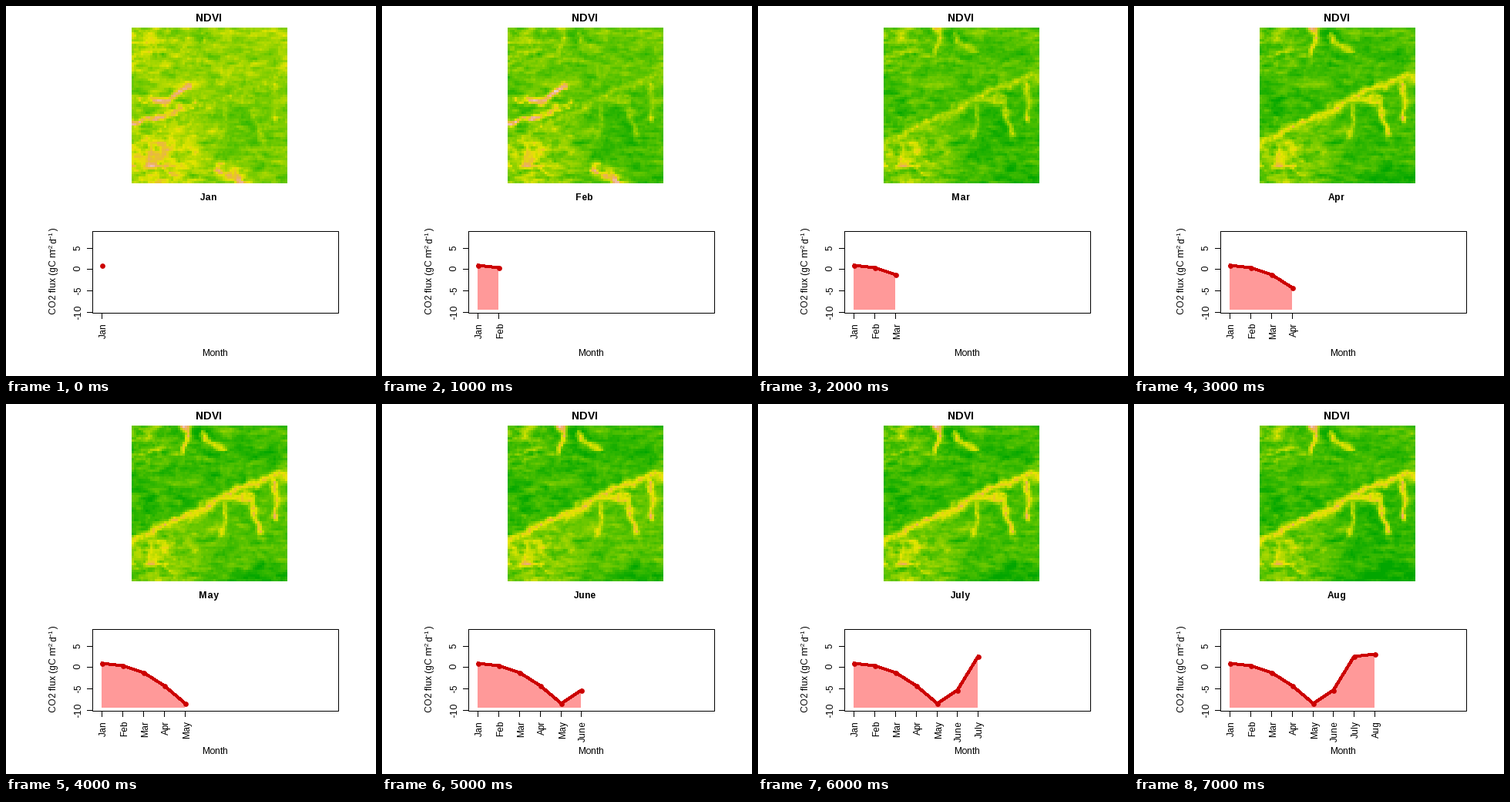
Write a matplotlib script that moves like this. It is 480 by 480 pixels and loops after 8 s.

```python
import colorsys

import numpy as np
import matplotlib.pyplot as plt
from matplotlib.animation import FuncAnimation
from matplotlib.colors import ListedColormap

plt.rcParams["font.family"] = "Liberation Sans"
plt.rcParams["text.hinting_factor"] = 1

MONTHS = ["Jan", "Feb", "Mar", "Apr", "May", "June", "July", "Aug"]
FLUX = np.array([1.0, 0.45, -1.2, -4.3, -8.5, -5.4, 2.6, 3.2])
DOT_X = np.round(124.1 + 26.87 * np.arange(8))
DOT_Y = np.round(341.5 - 5.5 * FLUX)
LEFT, TOP, SIZE, CELLS = 163, 28, 202, 67
RED, PINK = "#cc0000", "#ff9999"


def terrain(n=255):
    """Green to yellow to near white, mixed in HSV."""
    t = np.linspace(0, 1, n)
    stops = [0, 0.5, 1]
    h = np.interp(t, stops, [4 / 12, 2 / 12, 0])
    s = np.interp(t, stops, [1, 1, 0])
    v = np.interp(t, stops, [0.65, 0.9, 0.95])
    return ListedColormap([colorsys.hsv_to_rgb(*c) for c in zip(h, s, v)])


def noise(seed, sx, sy):
    """Smooth random field with unit spread; sx and sy are in cells."""
    field = np.random.default_rng(seed).normal(size=(CELLS, CELLS))
    fx = np.fft.fftfreq(CELLS)[None, :]
    fy = np.fft.fftfreq(CELLS)[:, None]
    blur = np.exp(-2 * np.pi ** 2 * ((fx * sx) ** 2 + (fy * sy) ** 2))
    field = np.fft.ifft2(np.fft.fft2(field) * blur).real
    return (field - field.mean()) / field.std()


step = (np.arange(CELLS) + 0.5) * SIZE / CELLS
GX, GY = np.meshgrid(LEFT + step, TOP + step)
WX = GX + 1.8 * noise(1, 1.5, 1.5)
WY = GY + 1.8 * noise(2, 1.5, 1.5)


def ridge(width, *points):
    """Soft band along a polyline."""
    best = np.full(GX.shape, 1e9)
    for (x0, y0), (x1, y1) in zip(points, points[1:]):
        dx, dy = x1 - x0, y1 - y0
        t = ((WX - x0) * dx + (WY - y0) * dy) / (dx * dx + dy * dy)
        t = np.clip(t, 0, 1)
        dist = (WX - x0 - t * dx) ** 2 + (WY - y0 - t * dy) ** 2
        best = np.minimum(best, dist)
    return np.exp(-best / width ** 2)


def blob(x, y, sx, sy):
    return np.exp(-((WX - x) / sx) ** 2 - ((WY - y) / sy) ** 2)


def rise(x, width):
    return 0.5 + 0.5 * np.tanh(x / width)


STREAMS = np.max([
    ridge(6, (160, 180), (205, 158), (245, 143), (285, 119), (352, 90), (367, 96)),
    ridge(4.5, (285, 122), (317, 120), (330, 166)),
    ridge(3.5, (346, 92), (349, 150)),
    0.7 * ridge(3.5, (284, 122), (282, 170)),
    ridge(4, (232, 30), (237, 46), (230, 63)),
    0.8 * ridge(3.5, (256, 38), (264, 52), (282, 60)),
], axis=0)

CLOUDS = np.max([
    ridge(4.5, (160, 154), (205, 142), (243, 129)),
    ridge(4.5, (180, 122), (212, 125), (234, 108)),
    ridge(6.5, (274, 211), (290, 221), (314, 229)),
], axis=0) * np.clip(0.9 + 0.3 * noise(6, 0.8, 0.6), 0.3, 1.3)

STREAKS = noise(3, 1.7, 0.6)
FINE = noise(4, 0.45, 0.45)
PATCHES = noise(5, 4, 2)
VEINS = np.exp(-(noise(7, 3, 2) / 0.35) ** 2)

SOUTH = rise(WY - 180 + 0.47 * (WX - LEFT), 8)
WEST = rise(250 - WX, 22)
CORNER = blob(185, 200, 50, 40)
HILLS = blob(185, 55, 45, 32)
TOP_EDGE = blob(238, 28, 60, 11) * (0.9 + 0.4 * PATCHES)
PEAK = blob(231, 28, 7, 8)


def ndvi(k):
    spring = np.clip(k / 4, 0, 1)
    spring = spring * spring * (3 - 2 * spring)
    summer = np.exp(-((k - 4.8) / 1.8) ** 2)
    thaw = np.exp(-k / 1.3)
    cloudy = np.exp(-((k - 0.6) / 0.85) ** 2)

    land = 0.13 + 0.19 * thaw + 0.04 * (1 - summer) * rise(100 - WY, 20)
    land += SOUTH * (0.13 * WEST + 0.11 * summer * (1 - 0.6 * WEST))
    land -= 0.09 * (1 - summer) * blob(310, 160, 40, 40)
    land -= 0.14 * spring * blob(320, 222, 50, 18)
    land += 0.16 * VEINS * (CORNER + spring * HILLS)
    land += TOP_EDGE * (0.16 + 0.18 * spring)
    rough = 0.8 + 0.6 * CORNER + 0.4 * HILLS
    land += rough * (0.045 * STREAKS + 0.025 * FINE + 0.025 * PATCHES
                     + 0.022 * noise(20 + k, 1.2, 0.6))

    bed = 0.42 + 0.14 * spring + 0.05 * FINE
    land += STREAMS * (0.55 + 0.45 * spring) * np.maximum(bed - land, 0)
    land += PEAK * (0.05 + 0.33 * spring) + 0.62 * cloudy * CLOUDS
    return np.clip(land, 0.01, 0.97)


MAPS = [ndvi(k) for k in range(8)]

# One unit is one pixel, y runs down.
fig = plt.figure(figsize=(480 / 72, 480 / 72), dpi=72, facecolor="white")
ax = fig.add_axes([0, 0, 1, 1])
ax.axis("off")


def label(x, y, text, size=12, ha="center", **kw):
    return ax.text(x, y, text, fontsize=size, ha=ha, va="baseline",
                   rotation_mode="anchor", **kw)


def stroke(xs, ys):
    return ax.plot(xs, ys, color="black", lw=1, solid_capstyle="projecting",
                   solid_joinstyle="miter")[0]


raster = ax.imshow(MAPS[0], cmap=terrain(), vmin=0, vmax=1,
                   interpolation="nearest", aspect="auto",
                   extent=(LEFT, LEFT + SIZE, TOP + SIZE, TOP))
ax.set_xlim(0, 480)
ax.set_ylim(480, 0)

label(262.7, 20, "NDVI", 14, weight="bold")
month = label(263, 252, "", weight="bold")
label(271.3, 454, "Month")

stroke([112, 431, 431, 112, 112], [292, 292, 398, 398, 292])
for value in (5, 0, -5, -10):
    y = round(341.4 - 5.53 * value)
    stroke([105, 112], [y, y])
    label(96.5, y, str(value), rotation=90)

y = 400
for text, width in [("CO2 flux (gC m", 82.5), ("−2", 9.5), ("d", 6.5),
                    ("−1", 9), (")", 4)]:
    raised = text[0] == "−"
    label(60.5 if raised else 65.5, y, text, 8.4 if raised else 12,
          ha="left", rotation=90)
    y -= width

ticks = [(stroke([x, x], [398, 405]),
          label(x + 6.3, 411.3, name, ha="right", rotation=90))
         for x, name in zip(DOT_X, MONTHS)]

area, = ax.fill([0], [0], color=PINK, lw=0, zorder=1.5, antialiased=False)
curve, = ax.plot([], [], color=RED, lw=3, marker="o", ms=6.8, mew=0, zorder=3,
                 antialiased=False)


def draw(k):
    n = k + 1
    raster.set_data(MAPS[k])
    month.set_text(MONTHS[k])
    xs, ys = DOT_X[:n], DOT_Y[:n]
    curve.set_data(xs + 0.5, ys + 0.5)
    area.set_xy(np.column_stack([np.r_[xs, xs[-1], xs[0]],
                                 np.r_[ys, 394, 394]]))
    area.set_visible(n > 1)
    for i, pair in enumerate(ticks):
        for part in pair:
            part.set_visible(i < n)
    return []


anim = FuncAnimation(fig, draw, frames=8, init_func=lambda: draw(0),
                     interval=1000, repeat=True, repeat_delay=0)
plt.show()
```
